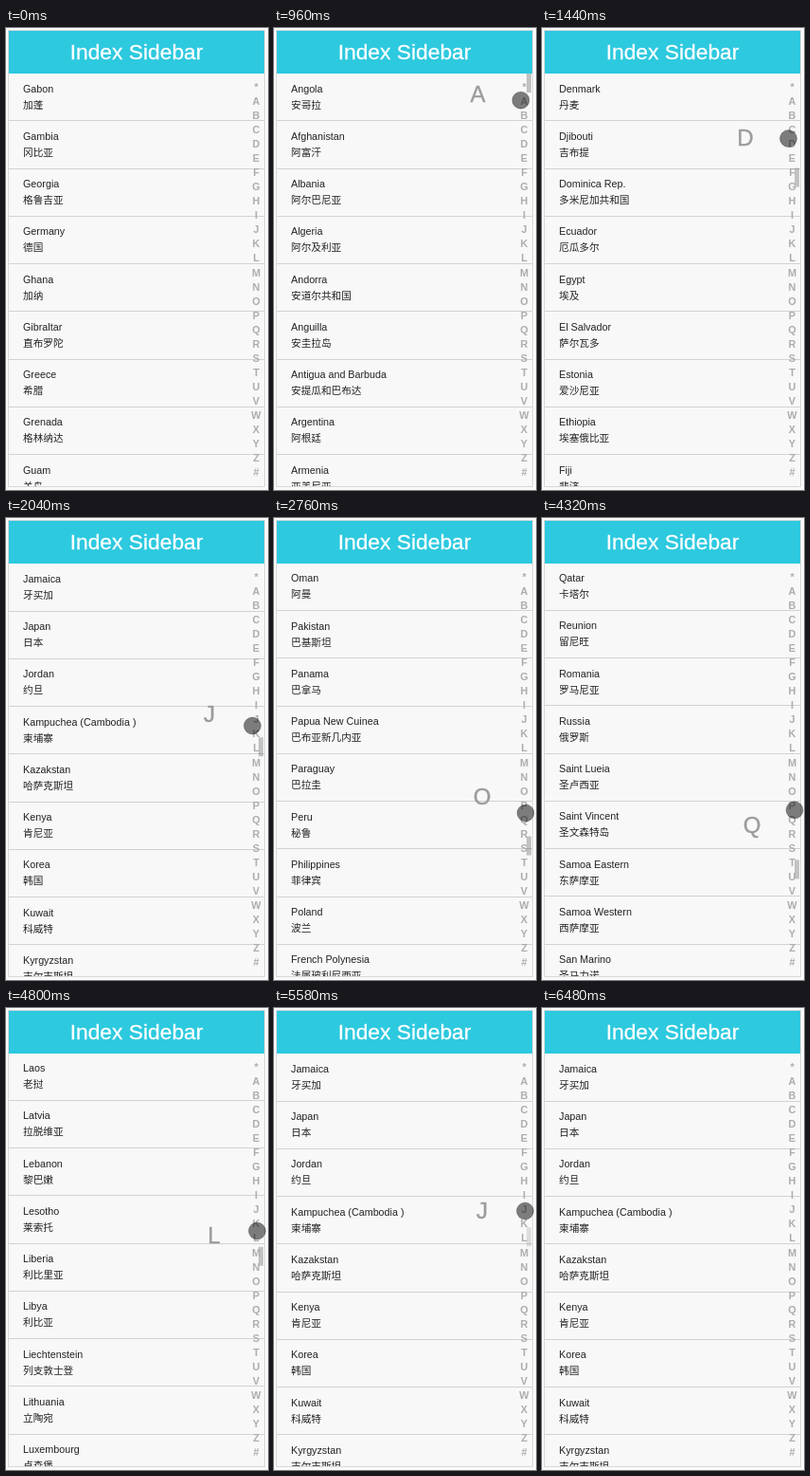
An HTML page with a canvas that plays this animation: 277x487 px, repeating every 7.14 s.

```html
<!DOCTYPE html>
<html lang="en">
<head>
<meta charset="utf-8">
<title>Index Sidebar</title>
<style>
html, body { margin: 0; width: 100%; height: 100%; overflow: hidden; background: #fafafa; }
canvas { display: block; width: 277px; height: 487px; }
</style>
</head>
<body>
<canvas id="stage"></canvas>
<script>
const W = 277, H = 487, LOOP = 7140, STEP = 60;
const LEFT = 3, TOP = 48, BOTTOM = 483, WIDTH = 270, ROW = 50.25;
const LETTERS = '*ABCDEFGHIJKLMNOPQRSTUVWXYZ#';
const LETTER_TOP = 62, LETTER_GAP = 15.04;
const TOUCH_LAG = 90;
const SANS = '"Liberation Sans", Arial, sans-serif';
const CJK = '"Noto Sans CJK SC", "Noto Sans CJK", "Noto Sans CJK JP", sans-serif';

const countries = `Angola 安哥拉|Afghanistan 阿富汗|Albania 阿尔巴尼亚|Algeria 阿尔及利亚|Andorra 安道尔共和国|Anguilla 安圭拉岛|Antigua and Barbuda 安提瓜和巴布达|Argentina 阿根廷|Armenia 亚美尼亚|Ascension 阿森松|Australia 澳大利亚|Austria 奥地利|Azerbaijan 阿塞拜疆
Bahamas 巴哈马|Bahrain 巴林|Bangladesh 孟加拉国|Barbados 巴巴多斯|Belarus 白俄罗斯|Belgium 比利时|Belize 伯利兹|Benin 贝宁|Bermuda Is. 百慕大群岛|Bolivia 玻利维亚|Botswana 博茨瓦纳|Brazil 巴西|Brunei 文莱|Bulgaria 保加利亚|Burkina-faso 布基纳法索|Burma 缅甸|Burundi 布隆迪
Cameroon 喀麦隆|Canada 加拿大|Cayman Is. 开曼群岛|Central African Republic 中非共和国|Chad 乍得|Chile 智利|China 中国|Colombia 哥伦比亚|Congo 刚果|Cook Is. 库克群岛|Costa Rica 哥斯达黎加|Cuba 古巴|Cyprus 塞浦路斯|Czech Republic 捷克
Denmark 丹麦|Djibouti 吉布提|Dominica Rep. 多米尼加共和国|Ecuador 厄瓜多尔|Egypt 埃及|El Salvador 萨尔瓦多|Estonia 爱沙尼亚|Ethiopia 埃塞俄比亚|Fiji 斐济|Finland 芬兰|France 法国|French Guiana 法属圭亚那
Gabon 加蓬|Gambia 冈比亚|Georgia 格鲁吉亚|Germany 德国|Ghana 加纳|Gibraltar 直布罗陀|Greece 希腊|Grenada 格林纳达|Guam 关岛|Guatemala 危地马拉|Guinea 几内亚|Guyana 圭亚那|Haiti 海地|Honduras 洪都拉斯|Hongkong 香港|Hungary 匈牙利
Iceland 冰岛|India 印度|Indonesia 印度尼西亚|Iran 伊朗|Iraq 伊拉克|Ireland 爱尔兰|Israel 以色列|Italy 意大利|Ivory Coast 科特迪瓦|Jamaica 牙买加|Japan 日本|Jordan 约旦
Kampuchea (Cambodia ) 柬埔寨|Kazakstan 哈萨克斯坦|Kenya 肯尼亚|Korea 韩国|Kuwait 科威特|Kyrgyzstan 吉尔吉斯坦|Laos 老挝|Latvia 拉脱维亚|Lebanon 黎巴嫩|Lesotho 莱索托|Liberia 利比里亚|Libya 利比亚|Liechtenstein 列支敦士登|Lithuania 立陶宛|Luxembourg 卢森堡
Macao 澳门|Madagascar 马达加斯加|Malawi 马拉维|Malaysia 马来西亚|Maldives 马尔代夫|Mali 马里|Malta 马耳他|Mariana Is 马里亚那群岛|Martinique 马提尼克|Mauritius 毛里求斯|Mexico 墨西哥|Moldova, Republic of 摩尔多瓦|Monaco 摩纳哥|Mongolia 蒙古|Montserrat Is 蒙特塞拉特岛|Morocco 摩洛哥|Mozambique 莫桑比克
Namibia 纳米比亚|Nauru 瑙鲁|Nepal 尼泊尔|Netheriands Antilles 荷属安的列斯|Netherlands 荷兰|New Zealand 新西兰|Nicaragua 尼加拉瓜|Niger 尼日尔|Nigeria 尼日利亚|North Korea 朝鲜|Norway 挪威|Oman 阿曼
Pakistan 巴基斯坦|Panama 巴拿马|Papua New Cuinea 巴布亚新几内亚|Paraguay 巴拉圭|Peru 秘鲁|Philippines 菲律宾|Poland 波兰|French Polynesia 法属玻利尼西亚|Portugal 葡萄牙|Puerto Rico 波多黎各|Qatar 卡塔尔|Reunion 留尼旺|Romania 罗马尼亚|Russia 俄罗斯
Saint Lueia 圣卢西亚|Saint Vincent 圣文森特岛|Samoa Eastern 东萨摩亚|Samoa Western 西萨摩亚|San Marino 圣马力诺|Sao Tome and Principe 圣多美和普林西比|Saudi Arabia 沙特阿拉伯|Senegal 塞内加尔|Seychelles 塞舌尔|Sierra Leone 塞拉利昂|Singapore 新加坡|Slovakia 斯洛伐克|Slovenia 斯洛文尼亚|Solomon Is 所罗门群岛|Somali 索马里|South Africa 南非|Spain 西班牙|Sri Lanka 斯里兰卡|St.Lucia 圣卢西亚|St.Vincent 圣文森特|Sudan 苏丹|Suriname 苏里南|Swaziland 斯威士兰|Sweden 瑞典|Switzerland 瑞士|Syria 叙利亚
Taiwan 台湾|Tajikstan 塔吉克斯坦|Tanzania 坦桑尼亚|Thailand 泰国|Togo 多哥|Tonga 汤加|Trinidad and Tobago 特立尼达和多巴哥|Tunisia 突尼斯|Turkey 土耳其|Turkmenistan 土库曼斯坦|Uganda 乌干达|Ukraine 乌克兰|United Arab Emirates 阿拉伯联合酋长国|United Kiongdom 英国|United States of America 美国|Uruguay 乌拉圭|Uzbekistan 乌兹别克斯坦
Venezuela 委内瑞拉|Vietnam 越南|Yemen 也门|Yugoslavia 南斯拉夫|Zimbabwe 津巴布韦|Zaire 扎伊尔|Zambia 赞比亚`
  .split(/[|\n]/).map(line => line.match(/^(.*) (\S+)$/).slice(1));

const MAX_SCROLL = countries.length * ROW - 436;

// Pointer path: time, x, y
const path = [
  [240, 275, 61], [480, 261, 70], [900, 261, 70], [1350, 260.5, 116], [1440, 260.5, 116.5],
  [1950, 260.5, 207], [2040, 260.5, 219], [2670, 265.5, 294], [2760, 266, 311],
  [3390, 270.5, 398.5], [3780, 270.5, 398.5], [3840, 270, 397.5], [4560, 265.5, 263],
  [4710, 265.5, 240], [4800, 265.5, 235], [5070, 265.5, 214], [6419, 265.5, 214], [6420, 274, 207.5]
];

const canvas = document.getElementById('stage');
const ctx = canvas.getContext('2d');
const dpr = window.devicePixelRatio || 1;
canvas.width = W * dpr;
canvas.height = H * dpr;

function pointerAt(t) {
  const i = path.findIndex(p => p[0] >= t);
  if (i === 0) return { x: path[0][1], y: path[0][2] };
  if (i < 0) return { x: path.at(-1)[1], y: path.at(-1)[2] };
  const [t0, x0, y0] = path[i - 1], [t1, x1, y1] = path[i];
  const k = (t - t0) / (t1 - t0);
  return { x: x0 + (x1 - x0) * k, y: y0 + (y1 - y0) * k };
}

const letterAt = y => LETTERS[Math.round((y - LETTER_TOP) / LETTER_GAP)];

function scrollTo(letter) {
  const i = countries.findIndex(([name]) => name[0] === letter);
  return Math.min(Math.round(Math.max(i, 0) * ROW), MAX_SCROLL);
}

function box(x, y, w, h, color) {
  ctx.fillStyle = color;
  ctx.fillRect(x, y, w, h);
}

function text(str, x, y, font, color, align = 'left', outline = 0) {
  ctx.font = font;
  ctx.fillStyle = ctx.strokeStyle = color;
  ctx.textAlign = align;
  ctx.fillText(str, x, y);
  if (outline) {
    ctx.lineWidth = outline;
    ctx.strokeText(str, x, y);
  }
}

function drawList(scroll) {
  ctx.save();
  ctx.beginPath();
  ctx.rect(LEFT, TOP, WIDTH, BOTTOM - TOP);
  ctx.clip();
  countries.forEach(([name, local], i) => {
    const y = TOP + i * ROW - scroll;
    if (y < TOP - ROW || y > BOTTOM) return;
    const top = Math.floor(y);
    text(name, 18, top + 20, `10.75px ${SANS}`, '#222');
    text(local, 18, top + 37, `10.65px ${CJK}`, '#222');
    box(LEFT, Math.floor(y + ROW - 0.35), WIDTH, 1, '#d2d2d2');
  });
  ctx.restore();
}

function drawScrollbar(scroll, t) {
  if (t < 900 || t >= 5700) return;
  const y = TOP + scroll / MAX_SCROLL * (BOTTOM - TOP - 20);
  box(267, y, 5, 20, `rgba(0,0,0,${t < 5580 ? 0.22 : 0.11})`);
}

function drawPointer({ x, y }) {
  ctx.beginPath();
  ctx.arc(x, y, 9, 0, Math.PI * 2);
  ctx.fillStyle = 'rgba(0,0,0,.5)';
  ctx.fill();
  ctx.strokeStyle = 'rgba(0,0,0,.25)';
  ctx.lineWidth = 1;
  ctx.stroke();
}

function draw(t) {
  const touching = t >= 900 && t < 5940;
  const touch = pointerAt(Math.min(Math.max(t - TOUCH_LAG, 900), 5160));
  const letter = letterAt(touch.y);
  const scroll = scrollTo(t < 900 ? 'G' : letter);

  ctx.setTransform(dpr, 0, 0, dpr, 0, 0);
  box(0, 0, W, H, '#fafafa');
  box(2, 2, 272, 482, '#d8d8d8');
  box(LEFT, 3, WIDTH, BOTTOM - 3, '#f8f8f8');
  drawList(scroll);
  drawScrollbar(scroll, t);

  box(LEFT, 3, WIDTH, 45, '#2dc9df');
  text('Index Sidebar', 138, 32.5, `22.8px ${SANS}`, '#fff', 'center', 0.3);

  [...LETTERS].forEach((c, i) => {
    const y = LETTER_TOP + i * LETTER_GAP + 4;
    text(c, 264.5, y, `bold 10.9px ${SANS}`, '#adadad', 'center');
  });

  if (touching) text(letter, touch.x - 45.5, touch.y + 7.5, `24px ${SANS}`, '#9c9c9c', 'center', 0.4);
  if (t >= 240 && t < 6480) drawPointer(pointerAt(t));
}

const start = performance.now();
function tick() {
  const t = (performance.now() - start) % LOOP;
  draw(Math.floor(t / STEP) * STEP);
  requestAnimationFrame(tick);
}
tick();
</script>
</body>
</html>
```
